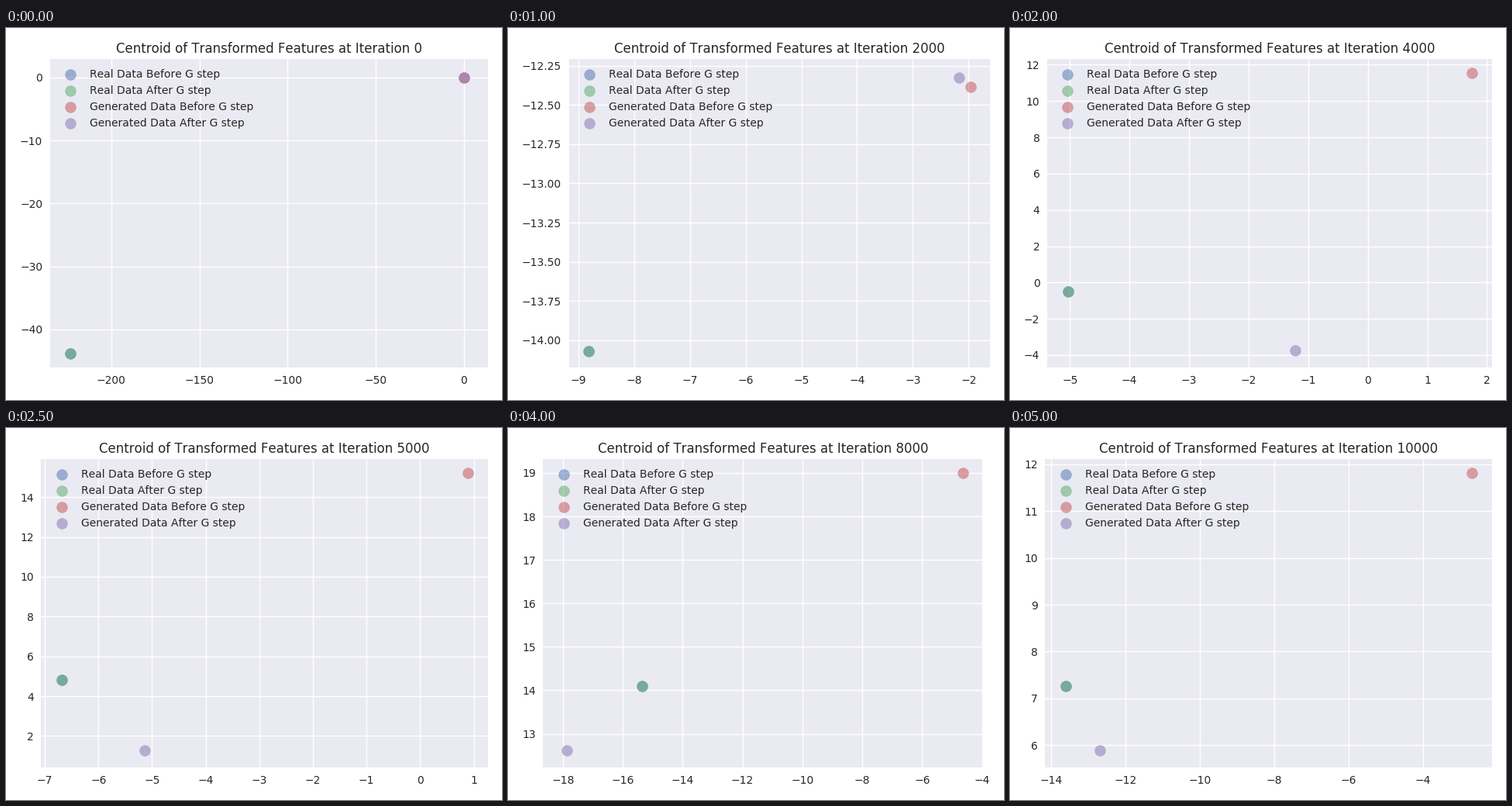
Recreate the animation shown at these times as a matplotlib script. Size 640 by 480 pixels, loop 5.5 s.

```python
import matplotlib.pyplot as plt
import numpy as np
from matplotlib.animation import FuncAnimation

INK = ".15"
plt.rcParams.update({
    "font.family": "DejaVu Sans",
    "font.size": 12,
    "text.color": INK,
    "text.kerning_factor": 6,
    "axes.titlesize": 12,
    "axes.facecolor": "#EAEAF2",
    "axes.axisbelow": True,
    "axes.grid": True,
    "grid.color": "white",
    "grid.linewidth": 1,
    "legend.fontsize": 10,
    "legend.frameon": False,
})
for axis in "xy":
    plt.rcParams.update({
        f"{axis}tick.color": INK,
        f"{axis}tick.labelsize": 10,
        f"{axis}tick.major.size": 0,
        f"{axis}tick.major.pad": 7,
    })
for side in ("left", "right", "top", "bottom"):
    plt.rcParams[f"axes.spines.{side}"] = False

FRAMES, STEP = 11, 1000
MARGIN = 0.05
RADIUS = 5 / np.array([496, 369.6])  # marker radius as a share of the unfitted axes
SERIES = [
    ("Real Data Before G step", "#4C72B0"),
    ("Real Data After G step", "#55A868"),
    ("Generated Data Before G step", "#C44E52"),
    ("Generated Data After G step", "#8172B2"),
]

# Key centroids: real, generated before the step, generated after it
KEYS = {
    0: [(-223.4, -43.84), (0, 0), (0, 0)],
    2000: [(-8.816, -14.072), (-1.958, -12.384), (-2.167, -12.324)],
    3000: [(-8.384, -26.8), (-2.295, -12.886), (-6.022, -29.16)],
    4000: [(-5.03, -0.5), (1.746, 11.53), (-1.222, -3.744)],
    6000: [(-8.33, 10.14), (0.03, 18.86), (-9.045, 6.28)],
    8000: [(-15.355, 14.095), (-4.645, 18.991), (-17.87, 12.617)],
    10000: [(-13.6, 7.258), (-2.685, 11.81), (-12.688, 5.884)],
}


def centroids(iteration):
    """One point per series, interpolated between the key centroids."""
    tracks = np.reshape(list(KEYS.values()), (len(KEYS), -1)).T
    values = [np.interp(iteration, list(KEYS), track) for track in tracks]
    real, before, after = np.reshape(values, (3, 2))
    return [real, real, before, after]


def limits(points):
    """Grow the view marker by marker, each padded by its size in the view so far."""
    low, high, view = np.inf, -np.inf, np.ones(2)
    for point in points:
        low = np.minimum(low, point - RADIUS * view)
        high = np.maximum(high, point + RADIUS * view)
        view = (high - low) * (1 + 2 * MARGIN)
    pad = (high - low) * MARGIN
    return zip(low - pad, high + pad)


fig = plt.figure(figsize=(6.4, 4.8), dpi=100, facecolor="white")


def draw(i):
    iteration = i * STEP
    points = centroids(iteration)
    fig.clear()
    fig.subplots_adjust(left=0.125, right=0.9, bottom=0.11, top=0.88)
    ax = fig.add_subplot()
    for (label, color), (x, y) in zip(SERIES, points):
        ax.scatter(x, y, s=100, color=color, alpha=0.5, linewidths=0.3, label=label)
    xlim, ylim = limits(points)
    ax.set(xlim=xlim, ylim=ylim)
    ax.set_title(f"Centroid of Transformed Features at Iteration {iteration}")
    ax.legend(loc="upper left")
    fig.tight_layout()
    return []


anim = FuncAnimation(fig, draw, frames=FRAMES, init_func=lambda: draw(0),
                     interval=500, repeat=True, repeat_delay=0)
plt.show()
```
